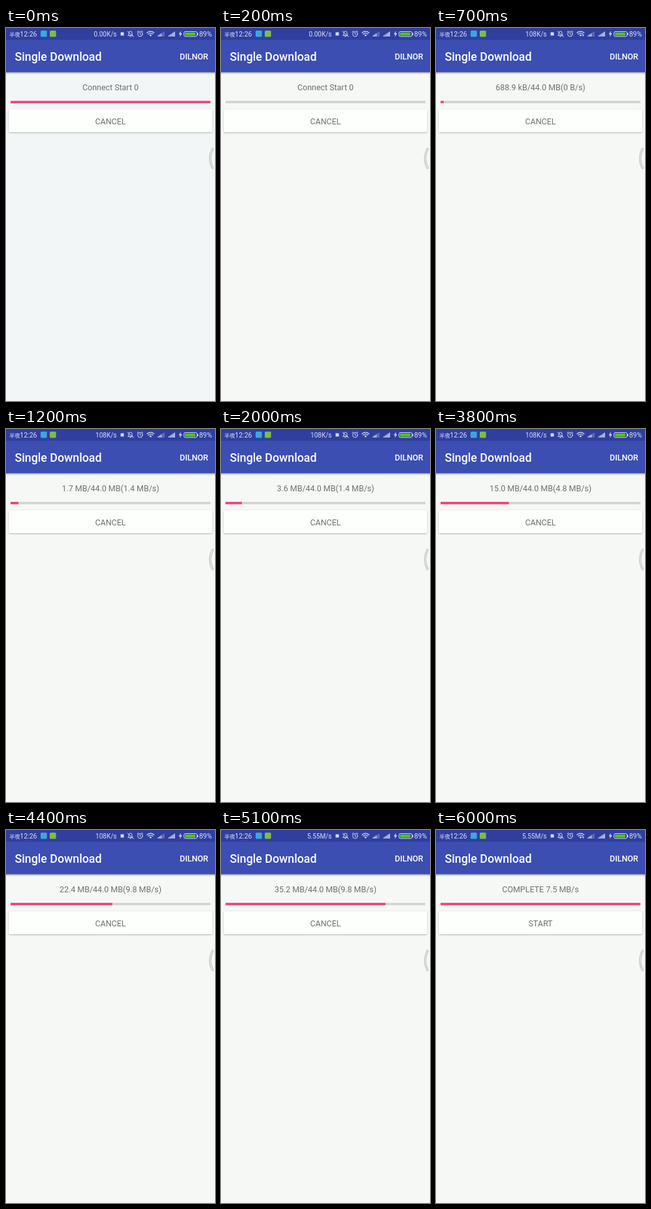
These frames come from a looping animation (320 px wide and 569 px high, 6.1 s). An HTML page:

```html
<!DOCTYPE html>
<html lang="en">
<head>
<meta charset="utf-8">
<title>Single Download</title>
<style>
  html, body { margin: 0; width: 100%; height: 100%; overflow: hidden; background: #f6f8f5; }
  svg { display: block; width: 100%; height: 100%; }
  text { font-family: Roboto, sans-serif; }
  .bar text { font-size: 10px; fill: #d9def5; }
  .label { font-size: 12.44px; fill: #6d706d; text-anchor: middle; }
  .line { fill: none; stroke: #d3d9f3; stroke-linecap: round; stroke-linejoin: round; }
  .soft { fill: #d3d9f3; }
</style>
</head>
<body>
<svg viewBox="0 0 320 569" preserveAspectRatio="none">
  <defs>
    <linearGradient id="shade" x2="0" y2="1">
      <stop offset="0" stop-color="#000" stop-opacity=".3"/>
      <stop offset="1" stop-color="#000" stop-opacity="0"/>
    </linearGradient>
    <filter id="lift" x="-5%" y="-20%" width="110%" height="150%">
      <feDropShadow dx="0" dy=".8" stdDeviation=".9" flood-opacity=".32"/>
    </filter>
  </defs>
  <rect id="page" width="320" height="569"/>
  <rect y="67" width="320" height="4" fill="url(#shade)"/>
  <rect width="320" height="67.5" fill="#3c4eb1"/>
  <rect width="320" height="18" fill="#303f9e"/>

  <g class="bar">
    <text x="5" y="12.6" style="font: 8.4px 'Noto Sans CJK SC', 'Noto Sans CJK', sans-serif">半夜</text>
    <text x="21.3" y="12.8" style="font-size: 10.5px">12:26</text>
    <rect x="53" y="4" width="9.6" height="9.6" rx="1.5" fill="#39a8df"/>
    <rect x="67" y="4" width="9.6" height="9.6" rx="1.5" fill="#79c043"/>
    <text id="net" x="169.5" y="12.6" text-anchor="end"></text>
    <rect class="soft" x="175.5" y="6.5" width="5" height="5"/>
    <g class="line">
      <path d="M187 11.3h7l-1-1.4V7.6a2.5 2.6 0 0 0-5 0v2.3zM189.6 12.8h1.8M186.2 5l9 8.3"/>
      <circle cx="205.3" cy="9.2" r="3.7"/>
      <path d="M205.3 7v2.4l1.5.9M201 6l1.8-1.6M209.6 6l-1.8-1.6"/>
      <path d="M216 7.3q5.3-4.3 10.6 0M217.8 9.3q3.5-2.8 7 0" stroke-width="1.3"/>
    </g>
    <path class="soft" d="M219.3 10.7q2-1.4 4 0l-2 2.3z"/>
    <path id="traffic" class="soft" d="M223.6 10.4h3.4l-1.7 2.6z"/>
    <g id="signal"></g>
    <path class="soft" d="M268 4.6l-3.6 4.9h2.3l-.8 3.9 3.9-5.2h-2.4z"/>
    <rect class="line" x="272.5" y="5.5" width="20" height="7.4" rx="2"/>
    <rect class="soft" x="293" y="7.6" width="1.3" height="3.2"/>
    <rect x="274" y="7" width="16" height="4.4" rx="1" fill="#4fc914"/>
    <text x="315.3" y="12.8" text-anchor="end" style="font-size: 10.6px">89%</text>
  </g>

  <text x="13.6" y="49.5" font-size="17.78" font-weight="500" fill="#fff">Single Download</text>
  <text x="309.6" y="47.6" font-size="12.44" font-weight="500" fill="#fff" text-anchor="end">DILNOR</text>

  <text id="status" class="label" x="160" y="95.2"></text>
  <rect x="7" y="111.2" width="306" height="3.5" fill="#d2d3d2"/>
  <rect id="fill" x="7" y="111.2" height="3.5" fill="#fb3b7c"/>
  <rect x="4.3" y="124" width="311.4" height="35" rx="1.8" fill="#fdfffc" filter="url(#lift)"/>
  <text id="button" class="label" x="160" y="146.7"></text>

  <path d="M316.2 184.5q-7.4 14.5 0 29" fill="none" stroke="#c3c5c3" stroke-width="3.6" stroke-linecap="round"/>
  <path d="M316.2 184.5q-7.4 14.5 0 29" fill="none" stroke="#dcdedb" stroke-width="2" stroke-linecap="round"/>
</svg>
<script>
const LOOP = 6100, STEP = 100, TOTAL = 44, DONE = 6000;

// [time in ms, MB received]
const received = [
  [300, 0], [400, .13], [700, .6889], [1400, 2.16], [1500, 2.16], [2000, 3.6], [2100, 3.6],
  [2300, 4.46], [2500, 4.46], [2600, 5.03], [2700, 5.03], [3200, 9.1], [3400, 11.07],
  [4100, 18], [4400, 22.4], [5100, 35.2], [5500, 39.25], [5900, 43]
];
const speeds = [[0, '0 B/s'], [1200, '1.4 MB/s'], [2200, '2.4 MB/s'], [3200, '4.8 MB/s'],
  [4200, '9.8 MB/s'], [5200, '17.6 MB/s']];
const netSpeeds = [[0, '0.00K/s'], [500, '108K/s'], [4500, '5.55M/s']];
const stages = [[0, 'Connect Start 0'], [100, 'Connect End 0'], [200, 'Connect Start 0'],
  [300, 'Connect End 0']];

const $ = id => document.getElementById(id);
const current = (list, t) => list.filter(([start]) => start <= t).pop()[1];
const size = mb => mb < 1 ? (mb * 1000).toFixed(1) + ' kB' : mb.toFixed(1) + ' MB';

function amount(t) {
  if (t < 200 || t >= DONE) return TOTAL;
  if (t <= received[0][0]) return 0;
  const i = received.findIndex(([time]) => time >= t);
  const [t0, a] = received[i - 1], [t1, b] = received[i];
  return a + (b - a) * (t - t0) / (t1 - t0);
}

function statusText(t) {
  if (t < 400) return current(stages, t);
  if (t >= DONE) return 'COMPLETE 7.5 MB/s';
  return `${size(amount(t))}/${size(TOTAL)}(${current(speeds, t)})`;
}

function signalBars(x, lit) {
  return [0, 1, 2, 3, 4].map(i =>
    `<rect x="${x + i * 2.1}" y="${11.2 - i * 1.4}" width="1.5" height="${1.8 + i * 1.4}"
      fill="#d3d9f3" opacity="${i < lit ? 1 : .4}"/>`).join('');
}

function draw(t) {
  $('page').setAttribute('fill', t < 100 ? '#f3f6f6' : '#f6f8f5');
  $('net').textContent = current(netSpeeds, t);
  $('traffic').setAttribute('visibility', (t >= 500 && t < 1000) || t >= 5700 ? 'visible' : 'hidden');
  $('status').textContent = statusText(t);
  $('fill').setAttribute('width', 306 * amount(t) / TOTAL);
  $('button').textContent = t >= DONE ? 'START' : 'CANCEL';
}

$('signal').innerHTML = signalBars(232.5, 3) + signalBars(248.7, 5);

const begin = performance.now();
function tick() {
  const t = (performance.now() - begin) % LOOP;
  draw(Math.floor(t / STEP) * STEP);
  requestAnimationFrame(tick);
}
tick();
</script>
</body>
</html>
```
